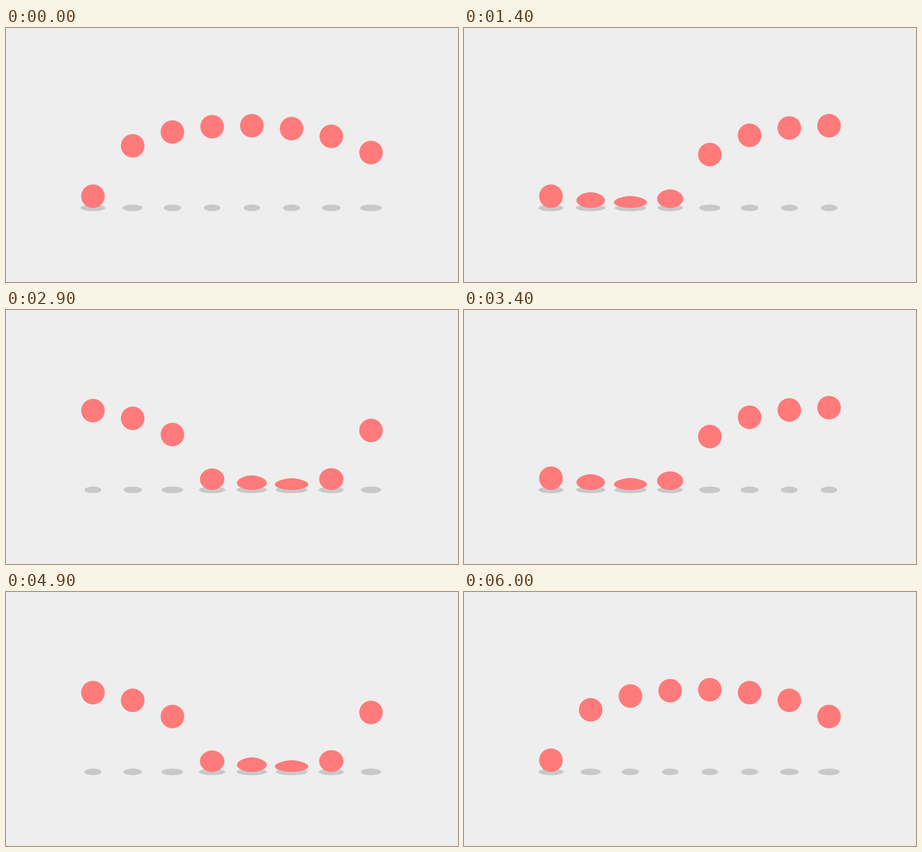
Recreate the animation shown at these times as an HTML page with a canvas. Size 998 by 561 pixels, loop 6.05 s.

```html
<!DOCTYPE html>
<html>
<head>
<meta charset="utf-8">
<title>Bouncing balls</title>
<style>
  html, body { margin: 0; width: 100%; height: 100%; overflow: hidden; background: #eee; }
  canvas { display: block; }
</style>
</head>
<body>
<canvas width="998" height="561"></canvas>
<script>
const ctx = document.querySelector('canvas').getContext('2d');
const LOOP = 6050, STEP = 50, PERIOD = 2000, LEAD = 180;
const COUNT = 8, LEFT = 192, GAP = 87.71;
const GROUND = 397.5, R = 26, RISE = 156, KAPPA = 0.5523;

const mix = (a, b, k) => a + (b - a) * k;

// Cubic timing curve, solved for x by bisection
function curve(x1, y1, x2, y2) {
  const at = (a, b, s) => 3 * a * s * (1 - s) ** 2 + 3 * b * s * s * (1 - s) + s ** 3;
  return x => {
    let lo = 0, hi = 1;
    for (let i = 0; i < 24; i++) {
      const mid = (lo + hi) / 2;
      if (at(x1, x2, mid) < x) lo = mid; else hi = mid;
    }
    return at(y1, y2, lo);
  };
}
const up = curve(0.08, 0.655, 0.35, 1);
const down = curve(0.53, 0.02, 0.98, 0.345);

// lift: height above ground, wide / flat: squash amounts, shade: shadow half width
function pose(p) {
  if (p < 700) {
    const x = p / 700;
    return { lift: up(x), wide: 0, flat: 0, shade: mix(18.2, 27.5, (1 - x) ** 3) };
  }
  if (p < 1400) {
    const x = (p - 700) / 700;
    return { lift: 1 - down(x), wide: 0, flat: 0, shade: mix(18.2, 27.5, x ** 2.3) };
  }
  if (p < 1800) {
    const x = (p - 1400) / 400;
    return {
      lift: 0,
      wide: x + x * (1 - x) * (x - 0.25),
      flat: 1 - (1 - x) ** 1.8,
      shade: mix(35, 27.5, (1 - x) ** 2)
    };
  }
  const x = (p - 1800) / 200;
  return { lift: 0, wide: (1 - x) ** 1.13, flat: 1 - x ** 1.53, shade: mix(27.5, 35, (1 - x) ** 2) };
}

function drawBall(x, { lift, wide, flat }) {
  const w = mix(R, 37, wide), h = mix(R, 13, flat);
  const bottom = GROUND - RISE * lift, top = bottom - 2 * h;
  const side = bottom - h + 0.7 * flat;
  const kt = R * KAPPA, kb = mix(kt, 17, wide), kv = h * KAPPA;
  ctx.fillStyle = '#ff7b7b';
  ctx.beginPath();
  ctx.moveTo(x, top);
  ctx.bezierCurveTo(x + kt, top, x + w, side - kv, x + w, side);
  ctx.bezierCurveTo(x + w, side + kv, x + kb, bottom, x, bottom);
  ctx.bezierCurveTo(x - kb, bottom, x - w, side + kv, x - w, side);
  ctx.bezierCurveTo(x - w, side - kv, x - kt, top, x, top);
  ctx.fill();
}

function drawShadow(x, { shade }) {
  ctx.fillStyle = '#c8c8c8';
  ctx.beginPath();
  ctx.ellipse(x, 397.3, shade, 7.3, 0, 0, 2 * Math.PI);
  ctx.fill();
}

function draw(t) {
  ctx.fillStyle = '#eee';
  ctx.fillRect(0, 0, 998, 561);
  for (let i = 0; i < COUNT; i++) {
    const x = LEFT + GAP * i, now = pose((t + LEAD * i) % PERIOD);
    drawShadow(x, now);
    drawBall(x, now);
  }
}

const start = performance.now();
function frame() {
  const t = (performance.now() - start) % LOOP;
  draw(Math.floor(t / STEP) * STEP);
  requestAnimationFrame(frame);
}
frame();
</script>
</body>
</html>
```
